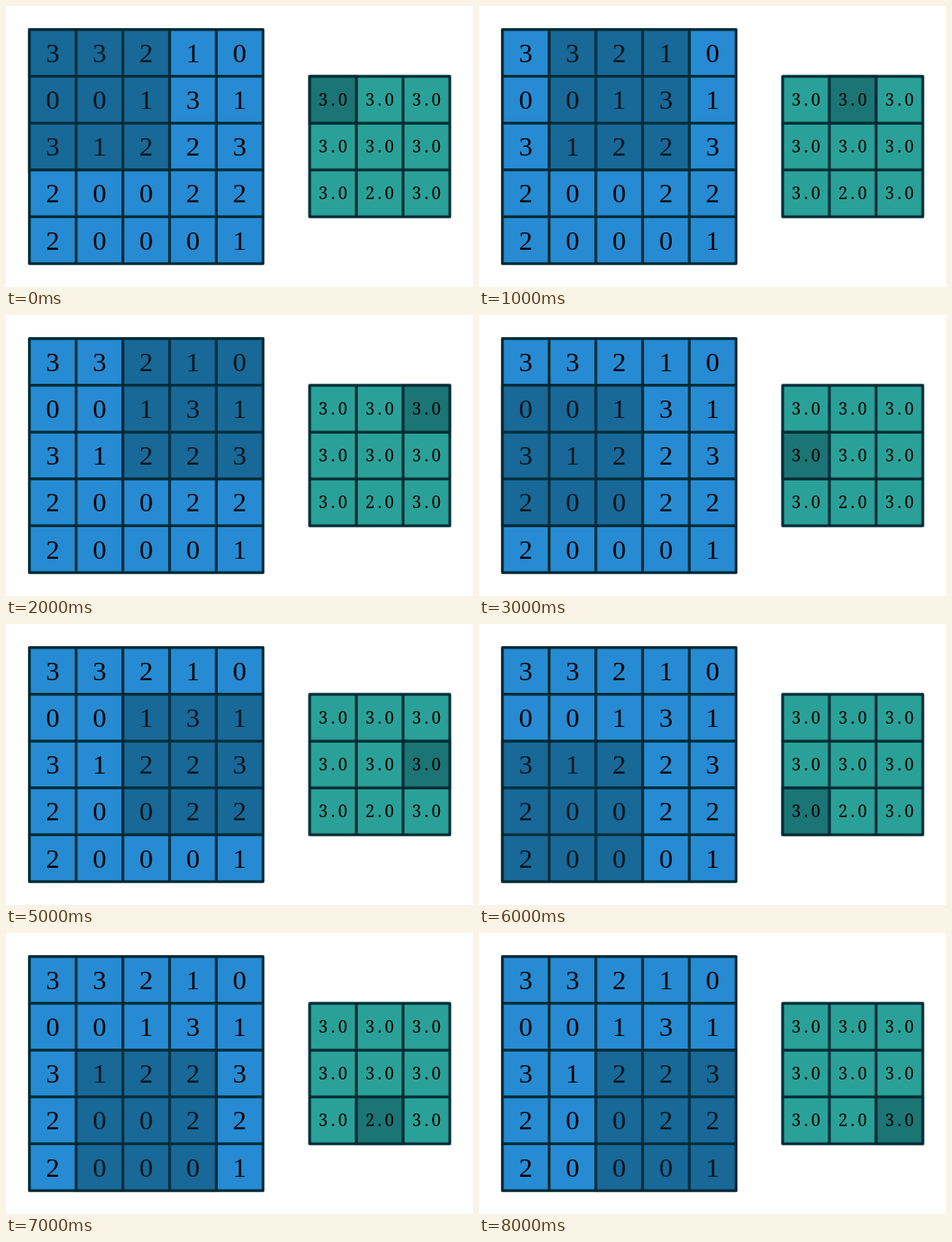
Animation, 591 px wide and 355 px high, one loop 9000 ms. Source, as an HTML page:

```html
<!DOCTYPE html>
<html lang="en">
<head>
<meta charset="utf-8">
<title>3×3 max pooling</title>
<style>
  html, body { margin: 0; width: 100%; height: 100%; overflow: hidden; background: #fff; }
  svg { display: block; width: 591px; height: 355px; }
  text { text-anchor: middle; fill: #000; }
  .lines { fill: none; stroke: #002b36; stroke-width: 3.5; stroke-linecap: round; }
  .input text { font: 34.5px "Liberation Serif", "Times New Roman", serif; }
  .output text { font: 21px "Noto Serif", serif; letter-spacing: 3.8px; }
  .shade { fill: #073642; stroke: #002b36; stroke-width: 3.5; opacity: .4; }
  /* the window scans three columns, then drops one row */
  .row { animation: down 9s steps(3, end) infinite; }
  .col { animation: across 3s steps(3, end) infinite; }
  @keyframes down { to { transform: translateY(177.42px); } }
  @keyframes across { to { transform: translateX(177.42px); } }
</style>
</head>
<body>
<svg viewBox="0 0 591 355" xmlns="http://www.w3.org/2000/svg"></svg>
<script>
  const CELL = 59.14;
  const input = ["33210", "00131", "31223", "20022", "20001"].map(r => [...r]);
  const output = [["3.0", "3.0", "3.0"], ["3.0", "3.0", "3.0"], ["3.0", "2.0", "3.0"]];

  function base(n, fill) {
    const size = n * CELL;
    let d = "";
    for (let i = 0; i <= n; i++) {
      const p = i * CELL;
      d += `M0 ${p}H${size}M${p} 0V${size}`;
    }
    return `<rect width="${size}" height="${size}" fill="${fill}"/><path class="lines" d="${d}"/>`;
  }

  function labels(rows, dx, dy) {
    return rows.map((row, y) => row.map((label, x) =>
      `<text x="${(x + .5) * CELL + dx}" y="${(y + .5) * CELL + dy}">${label}</text>`
    ).join("")).join("");
  }

  function shade(n) {
    const size = n * CELL;
    return `<g class="row"><g class="col"><rect class="shade" width="${size}" height="${size}"/></g></g>`;
  }

  document.querySelector("svg").innerHTML =
    `<g class="input" transform="translate(29.6 29.7)">
      ${base(5, "#268bd2")}${labels(input, 0, 11.7)}${shade(3)}
    </g>
    <g class="output" transform="translate(384.2 88.8)">
      ${base(3, "#2aa198")}${shade(1)}${labels(output, 1.9, 7.6)}
    </g>`;
</script>
</body>
</html>
```
